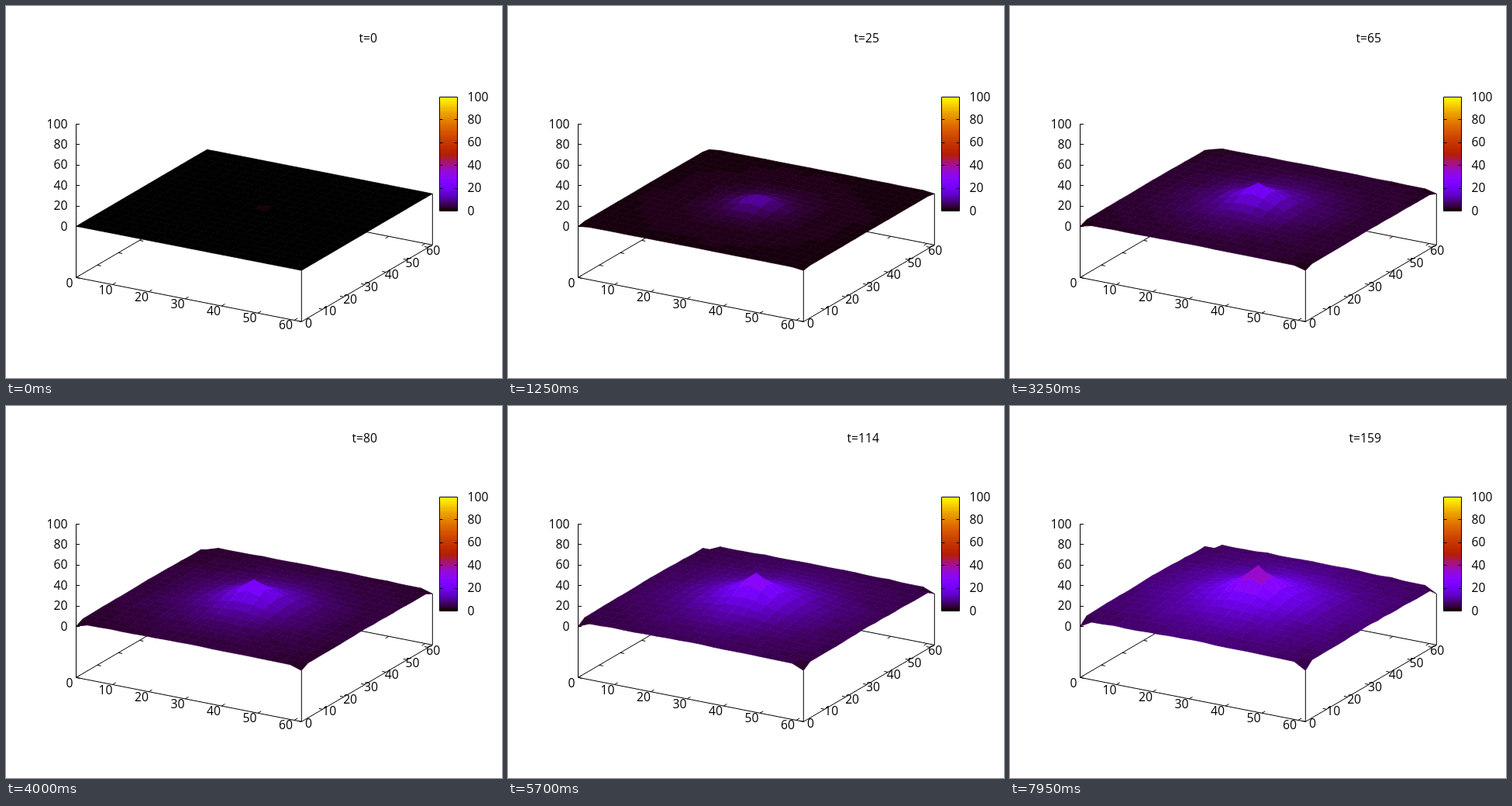
Animation of 640 by 480 pixels, one loop 8000 ms. Source, as an HTML page with a canvas:

```html
<!DOCTYPE html>
<html>
<head>
<meta charset="utf-8">
<style>
html, body { margin: 0; width: 100%; height: 100%; overflow: hidden; background: #fff; }
canvas { display: block; }
</style>
</head>
<body>
<canvas id="plot" width="640" height="480"></canvas>
<script>
const ctx = document.getElementById('plot').getContext('2d');
const RANGE = 62, CELLS = 20, LEVELS = 128;
const FLOOR = -50, STEP_MS = 50, STEPS = 160;

// Oblique view of the data box; x and y run from 0 to RANGE.
function project(x, y, z) {
  const u = x / RANGE, v = y / RANGE;
  return [90.5 + 290.8 * u + 169 * v, 284.3 + 57 * u - 99 * v - 1.32 * z];
}

function paletteColor(value) {
  const level = Math.max(0, Math.min(LEVELS - 1, Math.floor(value / 100 * LEVELS)));
  const g = level / (LEVELS - 1);
  const rgb = [Math.sqrt(g), g ** 3, Math.max(0, Math.sin(2 * Math.PI * g))];
  return `rgb(${rgb.map(c => Math.round(255 * c)).join(',')})`;
}

function seededRandom(seed) {
  return () => (seed = seed * 16807 % 2147483647) / 2147483647;
}
const random = seededRandom(4711);
const roughness = Array.from({ length: (CELLS + 1) ** 2 }, () => random() - 0.5);

// A spreading heap around the centre; the four corners stay at zero.
function height(i, j, step) {
  if (i % CELLS === 0 && j % CELLS === 0) return 0;
  const T = step + 1;
  const r2 = (i - CELLS / 2) ** 2 + (j - CELLS / 2) ** 2;
  const spread = 0.71 * T ** 0.477;
  const heap = 2.63 * T ** 0.348 * Math.log(1 + spread ** 2 / (r2 + 0.36)) / 2;
  const seed = i === 11 && j === 11 ? 1.6 * Math.exp(-step / 4) : 0;
  return 0.082 * T ** 0.766 + heap + seed + roughness[i * (CELLS + 1) + j] * T / 160;
}

function line(a, b) {
  ctx.beginPath();
  ctx.moveTo(...a);
  ctx.lineTo(...b);
  ctx.stroke();
}

function text(label, x, y, align) {
  ctx.textAlign = align;
  ctx.fillText(label, x, y + 5.5);
}

function drawSurface(step) {
  const size = RANGE / CELLS;
  const z = Array.from({ length: CELLS + 1 }, (_, i) =>
    Array.from({ length: CELLS + 1 }, (_, j) => height(i, j, step)));
  ctx.lineWidth = 0.7;
  ctx.lineJoin = 'round';
  for (let j = CELLS - 1; j >= 0; j--) {
    for (let i = 0; i < CELLS; i++) {
      const corners = [[i, j], [i + 1, j], [i + 1, j + 1], [i, j + 1]];
      const mean = corners.reduce((sum, [a, b]) => sum + z[a][b], 0) / 4;
      ctx.fillStyle = ctx.strokeStyle = paletteColor(mean);
      ctx.beginPath();
      for (const [a, b] of corners) ctx.lineTo(...project(a * size, b * size, z[a][b]));
      ctx.closePath();
      ctx.fill();
      ctx.stroke();
    }
  }
}

function drawBase() {
  const corners = [[0, 0], [RANGE, 0], [RANGE, RANGE], [0, RANGE]];
  corners.forEach(([x, y], k) => {
    line(project(x, y, FLOOR), project(...corners[(k + 1) % 4], FLOOR));
    line(project(x, y, FLOOR), project(x, y, 0));
  });
  const tick = ([x, y], dx, dy) => line([x, y], [x + dx, y + dy]);
  for (let n = 0; n <= 60; n += 10) {
    tick(project(n, 0, FLOOR), 4.3, -2.5);
    tick(project(n, RANGE, FLOOR), -4.3, 2.5);
    tick(project(RANGE, n, FLOOR), -4.9, -1);
    tick(project(0, n, FLOOR), 4.9, 1);
  }
}

function drawLabels(step) {
  ctx.fillStyle = '#000';
  ctx.font = '15.7px "Open Sans", sans-serif';
  text('t=' + step, 479, 41.5, 'right');
  for (let n = 0; n <= 60; n += 10) {
    text(n, 82 + 4.65 * n, 357.5 + 0.9 * n, 'center');
    text(n, 390.5 + 2.68 * n, 409.5 - 1.57 * n, 'center');
  }
  for (let n = 0; n <= 100; n += 20) {
    text(n, 79.5, 284 - 1.32 * n, 'right');
    text(n, 595.5, 264 - 1.47 * n, 'left');
  }
}

function drawColorBox() {
  const left = 559.5, right = 582.5, top = 117.5, bottom = 264.5;
  for (let y = top; y < bottom; y++) {
    ctx.fillStyle = paletteColor((bottom - y) / (bottom - top) * 100);
    ctx.fillRect(left, y - 0.5, right - left, 1);
  }
  ctx.strokeRect(left, top, right - left, bottom - top);
  for (let n = 20; n < 100; n += 20) {
    const y = Math.round(264 - 1.47 * n) + 0.5;
    line([left, y], [left + 4, y]);
    line([right - 4, y], [right, y]);
  }
}

function draw(step) {
  ctx.fillStyle = '#fff';
  ctx.fillRect(0, 0, 640, 480);
  ctx.strokeStyle = '#000';
  ctx.lineWidth = 1;
  drawBase();
  drawSurface(step);

  ctx.strokeStyle = '#000';
  ctx.lineWidth = 1;
  line([90.5, 152], [90.5, 350]);
  for (let n = 0; n <= 100; n += 20) {
    const y = Math.round(284 - 1.32 * n) + 0.5;
    line([90.5, y], [95, y]);
  }
  drawColorBox();
  drawLabels(step);
}

const start = performance.now();
let shown = -1;
function tick() {
  const step = Math.floor((performance.now() - start) / STEP_MS) % STEPS;
  if (step !== shown) draw(shown = step);
  requestAnimationFrame(tick);
}
tick();
</script>
</body>
</html>
```
